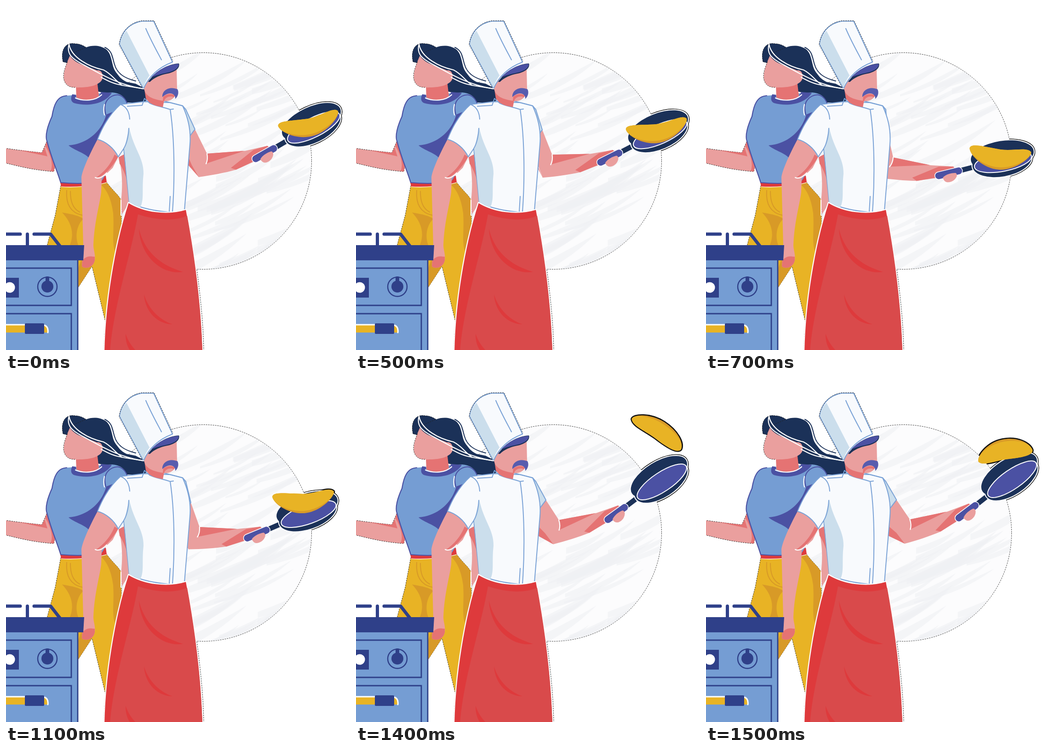
An HTML page for the animation above (1.6 s loop, 748 px wide and 748 px high).

```html
<!DOCTYPE html>
<html lang="en">
<head>
<meta charset="utf-8">
<title>Chefs</title>
<style>
html, body { margin: 0; width: 100%; height: 100%; overflow: hidden; background: #fff; }
svg { display: block; width: 100vw; height: 100vh; }
path, line { stroke-linecap: round; stroke-linejoin: round; }
.skin { fill: #ea9f9e; }
.blush { fill: #e57373; }
.navy { fill: #1b3158; }
.violet { fill: #4b51a3; }
.blue { fill: #759dd3; }
.pale { fill: #cbdeec; }
.white { fill: #f8fafd; }
.gold { fill: #e8b325; }
.amber { fill: #d89a27; }
.red { fill: #de3a3c; }
.ink { fill: #2f4089; }
.seam { stroke: #7aa2d6; stroke-width: 2; }
.chalk { fill: none; stroke: #fff; stroke-width: 2.2; }
.line { fill: none; }
.edge { stroke: #222; stroke-width: .9; stroke-dasharray: 3 2; stroke-linecap: butt; }
</style>
</head>
<body>
<svg viewBox="0 0 748 748">
  <defs>
    <clipPath id="disc"><circle cx="429" cy="337" r="235"/></clipPath>
    <g id="panShape">
      <ellipse cx="664" cy="252" rx="69" ry="32" transform="rotate(-25 664 252)"/>
      <ellipse cx="667" cy="265" rx="65" ry="32" transform="rotate(-26 667 265)"/>
    </g>
    <path id="cakeShape"/>
  </defs>

  <!-- dark rims, visible only outside the disc -->
  <g class="arm"><use href="#panShape" fill="#111" stroke="#111" stroke-width="7"/>
    <use href="#panShape" fill="#fff" stroke="#fff" stroke-width="4"/></g>
  <use class="cake" href="#cakeShape" fill="#111" stroke="#111" stroke-width="5"/>

  <circle cx="429" cy="337" r="235.5" fill="#fcfcfd" class="edge"/>
  <g id="streaks" clip-path="url(#disc)" fill="#f0f2f5" fill-opacity=".65"></g>

  <!-- woman -->
  <g>
    <path class="skin edge" d="M-3 309C30 314 60 317 78 319L90 291L107 345L104 360C60 357 30 349-3 341Z"/>
    <path class="blush" d="M28 313C50 316 65 318 78 319L84 308L90 327C75 323 50 319 28 313ZM90 292L107 345L104 360L97 359C104 345 96 320 85 304Z"/>
    <path class="gold edge" d="M119 391L218 382C232 402 246 411 251 424V500L240 600L217 690L187 566L157 612H80L89 522L107 455Z"/>
    <path class="amber" d="M205 387L218 383C232 402 246 411 251 424V480L240 540C228 520 236 490 233 450C229 420 220 400 205 387ZM122 449C145 453 160 456 168 463C152 478 150 505 158 522H138C150 495 142 470 122 449ZM168 540L187 566L157 612V570Z"/>
    <path class="line" stroke="#d89a27" stroke-width="2" d="M132 401C130 428 138 449 166 455M140 403C140 425 145 440 160 448M214 390C232 415 243 440 243 470"/>
    <path class="red" d="M118 384C150 387 180 386 207 381V372L217 369L219 383C190 392 150 394 120 393Z"/>
    <path class="chalk" style="stroke-width:1.2" d="M120 393C150 395 190 392 219 384"/>
    <path class="navy" d="M124 122C118 95 130 78 150 82C160 82 168 86 174 90C195 82 222 88 230 110C236 140 242 155 262 165L282 169L301 179L306 206L290 210H262C245 195 220 190 200 186L198 165L150 120L133 122Z"/>
    <path class="navy edge" d="M124 121C118 95 130 78 150 82C160 82 168 86 174 90L150 100L139 108L133 124Z"/>
    <path class="blue" d="M131 195C111 196 104 215 100 240C90 262 86 278 88 290C100 335 112 360 119 384C150 387 180 386 207 382L216 368L264 212C258 197 250 190 231 188Z"/>
    <path class="violet" d="M136 303C180 300 210 268 218 236L245 225L220 270L195 310L183 333C172 319 150 315 136 303Z"/>
    <path class="line" stroke="#4b51a3" stroke-width="2.2" d="M132 195C111 196 104 215 100 240C90 262 86 278 88 290C100 335 112 360 119 384C150 387 180 386 207 382M217 236C209 208 225 194 243 193C255 195 260 203 263 211"/>
    <path class="chalk" d="M214 214C212 223 212 230 214 237"/>
    <path class="violet" d="M144 192C140 201 141 208 148 211C175 219 215 214 230 189L207 187L200 200C180 206 163 206 152 202V193Z"/>
    <path class="blush" d="M152 174L153 199C168 206 190 206 202 196L198 162Z"/>
    <path class="chalk" d="M151 200C170 208 195 206 208 193"/>
    <path class="skin" d="M139 108C131 125 122 150 127 163C133 178 148 178 160 177C185 177 203 171 209 160C213 147 206 138 198 140C175 130 150 126 139 108Z"/>
    <path class="line edge" d="M134 121C127 137 122 152 127 163C131 173 138 177 150 177"/>
    <path class="chalk" d="M137 83C131 105 145 115 165 126C195 141 240 172 300 180M137 83C142 112 180 132 212 139C230 148 235 160 252 172M208 88C228 94 229 112 233 127C237 147 252 159 278 164M207 155C222 163 235 170 252 172"/>
    <path class="line" stroke="#1b3158" stroke-width="2" d="M215 90C232 98 231 112 236 127C241 146 256 157 282 163"/>
    <path class="skin" d="M245 329L258 322L263 362L268 428L252 453L250 425C254 390 253 360 245 329Z"/>
    <path class="blush" d="M245 329L258 322L263 378C258 362 252 350 247 343Z"/>
    <path class="chalk" d="M250 422V455"/>
  </g>

  <!-- moving arm, pan and pancake -->
  <path id="upper" class="skin"/>
  <path id="shade" class="blush"/>
  <path id="sleeve" class="pale seam"/>
  <g class="arm">
    <path class="skin" d="M437 321L520 315L568 304L577 309L540 338L500 356C475 363 447 368 419 372L405 340Z"/>
    <path class="blush" d="M437 321L518 315L437 342ZM489 352L538 313L568 304L576 309L542 327L538 338L500 356Z"/>
    <path class="chalk" d="M437 321C439 331 438 337 435 343"/>
    <line x1="582" y1="310" x2="616" y2="290" stroke="#fff" stroke-width="14"/>
    <line x1="582" y1="310" x2="616" y2="290" stroke="#1b3158" stroke-width="11"/>
    <line x1="543" y1="332" x2="582" y2="310" stroke="#fff" stroke-width="18"/>
    <line x1="543" y1="332" x2="582" y2="310" stroke="#4b51a3" stroke-width="15"/>
    <path class="skin" d="M553 333C558 324 569 318 577 316C583 318 582 326 577 333C570 341 559 345 553 333Z"/>
    <use href="#panShape" fill="#fff" stroke="#fff" stroke-width="4"/>
    <use href="#panShape" class="navy"/>
    <ellipse cx="669" cy="264" rx="63" ry="21" transform="rotate(-27 669 264)" class="violet" stroke="#fff" stroke-width="2"/>
  </g>
  <g class="cake">
    <use href="#cakeShape" class="amber"/>
    <path id="cakeTop" class="gold"/>
  </g>

  <!-- chef -->
  <g>
    <path class="skin" d="M199 290C180 325 165 360 164 373L168 520L165 566C172 573 190 569 193 553C195 540 190 530 190 520C192 470 204 430 207 405L208 375L232 352L244 328L235 290Z"/>
    <path class="blush" d="M195 374C212 372 232 349 244 328L236 323C228 345 212 362 195 374ZM166 553C178 540 188 546 193 545V553C190 569 172 573 165 566Z"/>
    <path class="chalk" d="M194 373C203 377 213 370 219 363"/>
    <path class="white seam" d="M249 214L299 208L357 210L384 217C397 245 402 275 400 300L388 444L364 449C330 447 295 440 268 428L256 310L244 328C235 309 216 294 199 290C210 262 225 235 249 214Z"/>
    <path class="pale" d="M268 264C277 310 300 330 299 365C295 400 301 420 292 438L268 428L257 311Z"/>
    <path class="line seam" d="M249 214C262 219 268 230 269 246M267 266C266 285 262 300 256 310M264 218L296 216L301 201L312 211C323 217 340 219 357 225C367 290 367 380 362 447M357 225L364 224M357 414L355 447M345 207L384 217"/>
    <path class="blush" d="M300 175L304 201L312 210C322 217 332 218 341 220L344 205L342 185Z"/>
    <path class="skin" d="M301 166C320 157 345 142 371 136L372 180C371 199 358 209 341 206C320 203 303 197 300 179Z"/>
    <path class="blush" d="M341 206L342 197C352 190 362 190 367 195C362 204 352 208 341 206Z"/>
    <path class="skin" d="M344 206C347 197 358 195 364 198C360 205 352 208 344 206Z"/>
    <path fill="#575cae" d="M340 198C339 182 357 174 373 181C377 189 373 198 368 202C369 190 355 184 340 198Z"/>
    <path class="navy" d="M309 165C325 141 352 126 376 125C379 136 366 144 351 147C335 150 322 156 313 165Z"/>
    <path class="violet" d="M316 155C330 139 352 127 375 126C377 135 364 142 350 145C336 148 325 151 316 155Z"/>
    <path class="white seam" d="M247 83C250 60 265 38 295 33L321 33L362 122C338 131 313 147 299 180Z"/>
    <path class="pale" d="M262 54C254 62 249 72 248 83L299 178C302 167 306 160 312 151Z"/>
    <path class="line seam" d="M304 49C315 75 328 98 338 117"/>
    <path class="line edge" d="M298 181L246 84C249 60 265 37 295 32L322 32L363 120"/>
    <path class="line" stroke="#fff" stroke-width="2" d="M250 172L299 180"/>
    <path class="line edge" d="M415 573C423 635 429 690 430 750M213 750C213 725 214 705 217 685"/>
    <path class="red" stroke="#fff" stroke-width="2.2" d="M266 427C300 448 350 455 392 442C410 540 425 650 428 752H213C215 650 235 520 266 427Z"/>
    <path fill="#d94a4b" d="M287 453C320 464 362 470 394 456C411 550 424 650 427 750H226C234 650 272 540 287 453Z"/>
    <path class="red" d="M289 484C300 530 330 562 385 578C340 586 292 545 289 484ZM300 627C310 660 335 683 362 692C332 692 303 668 300 627ZM260 713C266 730 275 742 285 752H272C264 742 260 730 260 713Z"/>
  </g>

  <!-- stove -->
  <g>
    <path class="line" stroke="#2f4089" stroke-width="7" d="M-5 496H31M46.500 496V522M61 496H97L118 523"/>
    <rect class="blue" y="550" width="157" height="200"/>
    <path class="ink" d="M0 520H170L168 553H0Z"/>
    <path class="line" stroke="#2f4089" stroke-width="2.800" style="stroke-linejoin:miter" d="M156 552V750M-5 570H142V651H-5M-5 669H142V752"/>
    <rect class="ink" y="591" width="28" height="43"/>
    <circle cx="8" cy="612" r="11.500" fill="#fff"/>
    <circle cx="90" cy="610.500" r="21" fill="none" stroke="#2f4089" stroke-width="2.500"/>
    <circle class="ink" cx="90" cy="610" r="13"/>
    <rect class="ink" x="86" y="588" width="8" height="16" rx="3"/>
    <path class="gold" d="M0 693H80C90 693 93 700 92 710H0Z"/>
    <path class="chalk" style="stroke-width:3" d="M-3 693H42M83 694C90 696 92 702 91 710"/>
    <rect class="ink" x="41" y="690" width="42" height="23" rx="2"/>
  </g>
</svg>
<script>
const LOOP = 1600, PIVOT = [568, 328];
// start time; hand x, y, arm turn; pancake x, y, turn, half length, bulge above and below its chord
const poses = [
  [0, 568, 328, 0, 657, 246, -13, 67, 1, 38],
  [500, 557, 337, 3, 653, 258, -9, 67, 1, 40],
  [600, 545, 354, 9, 647, 284, -3, 67, 2, 41],
  [700, 531, 372, 16, 640, 315, 5, 67, 3, 41],
  [1100, 550, 347, 7, 646, 254, -4, 67, 2, 40],
  [1200, 562, 318, -1.3, 648, 165, -50, 68, 11, 23],
  [1300, 568, 308, -4.5, 656, 128, -98, 66, 11, 25],
  [1400, 572, 301, -6.5, 654, 121, -147, 63, 10, 30],
  [1500, 574, 297, -7.6, 651, 168, -191, 60, 9, 35]
];

const $ = id => document.getElementById(id);
const setPath = (id, d) => $(id).setAttribute('d', d);
const setAll = (sel, value) =>
  document.querySelectorAll(sel).forEach(el => el.setAttribute('transform', value));

let seed = 7;
const rand = (lo, hi) => {
  seed = (seed * 16807) % 2147483647;
  return lo + (hi - lo) * seed / 2147483647;
};

// Tapered brush strokes rising to the right
function addStreaks() {
  let out = '';
  for (let i = 0; i < 80; i++) {
    const x = rand(150, 580), y = rand(120, 620), len = rand(80, 240);
    const rise = len * rand(.4, .55), w = rand(3, 14);
    out += `<path d="M${x} ${y}q${len * .5} ${-rise * .4} ${len} ${-rise}q${-len * .4} ${rise * .7 + w} ${-len} ${rise + w}z"/>`;
  }
  $('streaks').innerHTML = out;
}

const cake = (half, lift, depth) =>
  `M${-half} 0C${1 - half}-12-35 ${-lift - 3} 0 ${-lift}C30 ${1 - lift} ${half - 9}-14 ${half}-3` +
  `C${half + 3} 8 35 ${depth} 0 ${depth}C-35 ${depth} ${2 - half} 15 ${-half} 0Z`;

function show([, hx, hy, turn, cx, cy, spin, half, lift, depth]) {
  const a = turn * Math.PI / 180, c = Math.cos(a), s = Math.sin(a);
  const place = (x, y) => {
    const dx = x - PIVOT[0], dy = y - PIVOT[1];
    return [hx + dx * c - dy * s, hy + dx * s + dy * c];
  };
  const top = place(437, 321), tip = place(419, 372);
  const cuffX = 402 + (top[0] - 421) * .55, cuffY = 268 + turn * .4;
  setAll('.arm', `translate(${hx} ${hy}) rotate(${turn}) translate(${-PIVOT[0]} ${-PIVOT[1]})`);
  setAll('.cake', `translate(${cx} ${cy}) rotate(${spin})`);
  setPath('cakeShape', cake(half, lift, depth));
  setPath('cakeTop', cake(half, lift, depth - 5));
  setPath('upper', `M385 222L${cuffX} ${cuffY}L${top}L${place(436, 343)}L${tip}L396 335Z`);
  setPath('shade', `M392 318L${place(404, 346)}L${tip}L392 341Z`);
  setPath('sleeve', `M384 217L391 225L${cuffX} ${cuffY}L${cuffX - 12} ${cuffY + 16}L390 290Z`);
}

function tick() {
  const t = performance.now() % LOOP;
  show(poses.findLast(p => p[0] <= t));
  requestAnimationFrame(tick);
}

addStreaks();
tick();
</script>
</body>
</html>
```
